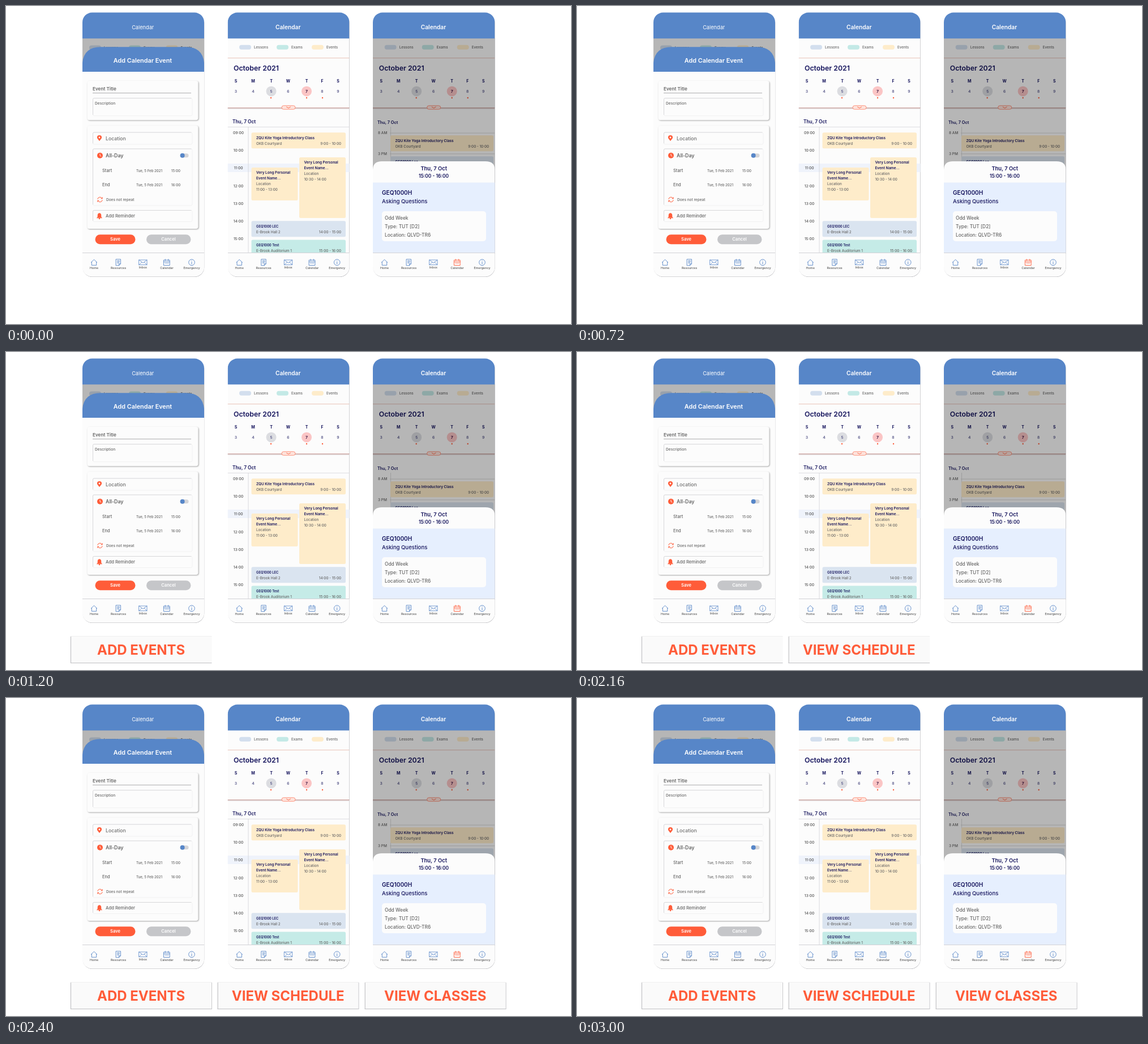
Recreate the animation shown at these times as an HTML page. Size 998 by 561 pixels, loop 3400 ms.

```html
<!DOCTYPE html>
<html lang="en">
<head>
<meta charset="utf-8">
<title>Calendar screens</title>
<style>
html, body { margin: 0; width: 100%; height: 100%; overflow: hidden; background: #fff; }
svg { display: block; width: 100%; height: 100%; }
text { font-family: Inter, "Open Sans", sans-serif; white-space: pre; }
.card { filter: drop-shadow(1.2px 1.2px .8px rgba(0, 0, 0, .34)); }
</style>
</head>
<body>
<svg id="stage" viewBox="0 0 998 561"></svg>
<script>
const BLUE = '#5786c8', NAVY = '#14135c', ORANGE = '#ff5c39', GRAY = '#666', PAPER = '#fcfcfc';
const SAND = '#feecca', MINT = '#c5ebe7', SKY = '#dae4f0';

const text = (x, y, s, size, fill = GRAY, weight = 500, anchor = 'start') =>
  `<text x="${x}" y="${y}" font-size="${size}" fill="${fill}" font-weight="${weight}" text-anchor="${anchor}">${s}</text>`;
const mid = (x, y, s, size, fill, weight) => text(x, y, s, size, fill, weight, 'middle');
const end = (x, y, s, size, fill, weight) => text(x, y, s, size, fill, weight, 'end');
const rect = (x, y, w, h, fill, r = 0, more = '') =>
  `<rect x="${x}" y="${y}" width="${w}" height="${h}" rx="${r}" fill="${fill}" ${more}/>`;
const dot = (x, y, r, fill, more = '') => `<circle cx="${x}" cy="${y}" r="${r}" fill="${fill}" ${more}/>`;
const path = (d, stroke, width = 1, fill = 'none') =>
  `<path d="${d}" stroke="${stroke}" stroke-width="${width}" fill="${fill}" stroke-linejoin="round" stroke-linecap="round"/>`;
const shift = (x, y, body) => `<g transform="translate(${x} ${y})">${body}</g>`;
const shade = (x, h) => rect(x, 57, 218, h, '#000', 0, 'opacity=".28"');

const icons = {
  Home: c => path('M-5.2 0L0-5L5.2 0M-4.2-.8V5H4.2V-.8', c, .9),
  Resources: c => path('M-4-5.5H4V2.5L1 5.5H-4ZM4 2.5H1V5.5M-2-3H2M-2-1H2M-2 1H1', c, .9),
  Inbox: c => path('M-7-4.3H7V4.3H-7ZM-7-4.3L0 1L7-4.3M-7 4.3L-2-.5M7 4.3L2-.5', c, .8),
  Calendar: c => path('M-5.2-4H5.2V5.2H-5.2ZM-5.2-1H5.2M-2.7-5.6V-3M2.7-5.6V-3M-3 1.4H-2M-.5 1.4H.5M2 1.4H3', c, .9),
  Emergency: c => dot(0, 0, 5.3, 'none', `stroke="${c}" stroke-width=".9"`) + path('M0-.5V2.7M0-2.7V-2.5', c, 1),
};

function nav(x, active) {
  const spots = [20.5, 63.5, 107, 149, 193];
  return rect(x, 435, 216, 43, PAPER) + rect(x, 435, 216, .8, '#c9c9cd') +
    Object.keys(icons).map((name, i) =>
      shift(x + spots[i], 452.3, icons[name](name === active ? ORANGE : BLUE)) +
      mid(x + spots[i], name === 'Inbox' ? 463.3 : 464.4, name, 5.4, '#555', 500)).join('');
}

function phone(id, x, w, body, active) {
  return `<clipPath id="${id}">${rect(x, 11.6, w, 465.7, '#000', 17)}</clipPath>` +
    rect(x + .3, 13, w, 465, '#b4b4b8', 17) +
    `<g clip-path="url(#${id})">${rect(x, 11, w, 467, PAPER)}${body}${nav(x, active)}</g>`;
}

const header = (x, w, size, weight) =>
  rect(x, 11, w, 46.3, BLUE) + mid(x + w / 2 - .8, 41, 'Calendar', size, '#fff', weight);

const legend = (x, gaps) => ['Lessons', 'Exams', 'Events'].map((s, i) =>
  rect(x + gaps[i], 68.7, 21, 8, ['#d3dfee', '#c3e9e6', SAND][i], 4) +
  text(x + gaps[i] + 26, 75, s, 6.3)).join('');

function week() {
  const xs = [406, 436.5, 468.5, 498.5, 531, 558.5, 586.5];
  return legend(412, [0, 66, 128]) + rect(391, 91.3, 217, 1, '#e8c0b6') +
    text(402, 114.4, 'October 2021', 12.3, NAVY, 600) +
    dot(468.5, 150.4, 9, '#dcdde1') + dot(531, 150.4, 9, '#fbc5c5') +
    xs.map((x, i) => mid(x, 135, 'SMTWTFS'[i], 7, NAVY, 700) +
      mid(x, 153.4, i + 3, 6.8, i === 4 ? '#3b1540' : '#45457c', i === 4 ? 700 : 500)).join('') +
    [468, 531, 559].map(x => dot(x, 162, 1.2, ORANGE)).join('') +
    rect(391, 180.4, 217, 1.4, '#e3dfe1') + rect(391, 179.2, 217, 1.3, '#c99d98') +
    rect(487, 175.7, 24, 6.6, '#fde3dc', 3.3, `stroke="${ORANGE}" stroke-width=".6"`) +
    path('M495.5 178L499 180.2L502.5 178', ORANGE, .9);
}

// One schedule block; the lines run downwards, the first `bold` of them in strong type.
function block(x, y, w, h, fill, lines, bold = 1, time = '', size = 6.4) {
  return rect(x, y, w, h, fill, 2.5) +
    lines.map((s, i) => text(x + 8.5, y + 11.2 + i * 9.8 + (i === 1 && bold === 1 ? .7 : 0), s,
      i < bold ? size : 6.25, i < bold ? NAVY : GRAY, i < bold ? 600 : 500)).join('') +
    (time && end(x + w - 8, y + 21.7, time, 6.25));
}

const lesson = ['ZQU Kite Yoga Introductory Class', 'OKB Courtyard'];
const longName = ['Very Long Personal', 'Event Name...', 'Location'];

function schedule() {
  const hours = Array.from({ length: 7 }, (_, i) =>
    mid(410.5, 226.2 + i * 31.1, String(i + 9).padStart(2, '0') + ':00', 6.6, '#555', 500)).join('');
  return header(391.5, 215, 10.2, 600) + week() +
    text(400, 207.2, 'Thu, 7 Oct', 8.3, NAVY, 600) +
    rect(391, 213, 217, .8, '#d8d8dc') + rect(391, 278, 217, 15, '#eff3fb') +
    rect(427.6, 213, .8, 222, '#d2d2d6') + hours +
    block(433.5, 223.3, 166.5, 28, SAND, lesson, 1, '9:00 - 10:00') +
    block(433.5, 285, 82, 58, SAND, [...longName, '11:00 - 13:00'], 2) +
    block(518, 267, 82, 107, SAND, [...longName, '10:30 - 14:00'], 2) +
    block(433.5, 379.3, 166.5, 28, SKY, ['GEQ1000 LEC', 'E-Brook Hall 2'], 1, '14:00 - 15:00', 5.9) +
    block(433.5, 412.6, 166.5, 28, MINT, ['GEQ1000 Test', 'E-Brook Auditorium 1'], 1, '15:00 - 16:00', 5.9);
}

function details() {
  return shift(256.7, 0, week()) +
    text(656, 207.8, 'Thu, 7 Oct', 7.3, NAVY, 600) +
    text(657, 226.4, '8 AM', 6.5) + text(657, 263.2, '3 PM', 6.5) +
    rect(678, 223.7, 186, .8, '#ccc') + rect(678, 260.5, 186, .8, '#ccc') + rect(679, 213, .7, 70, '#ccc') +
    block(679, 228.3, 182, 28, SAND, lesson, 1, '9:00 - 10:00') +
    block(679, 265.3, 182, 28, SKY, ['GEQ1000 Lec'], 1, '', 6.2) +
    shade(647, 380) + header(648, 215.5, 10.2, 600) +
    path('M648 436V289Q648 274 664 274H847Q863.5 274 863.5 289V436Z', 'none', 0, PAPER) +
    rect(648, 311.5, 216, 124, '#e6effe') +
    mid(755.7, 290.4, 'Thu, 7 Oct', 9.4, NAVY, 600) +
    mid(755.5, 303.2, '15:00 - 16:00', 8.4, NAVY, 600) +
    text(664, 333.3, 'GEQ1000H', 10.1, NAVY, 600) +
    text(664, 348.2, 'Asking Questions', 9.6, NAVY, 500) +
    rect(664, 362, 184, 53, PAPER, 5) +
    ['Odd Week', 'Type: TUT [D2]', 'Location: QLVD-TR6'].map((s, i) =>
      text(669, 376.6 + i * 15.2, s, 8.4)).join('');
}

const field = (y, h) => rect(153.5, y, 175.5, h, PAPER, 2.5, 'stroke="#ececee" stroke-width=".7"') +
  path(`M153.5 ${y + h - 2}V${y + 2}Q153.5 ${y} 155.5 ${y}H327`, '#d2d2d5', .8);
const panel = (y, h) => rect(143.5, y, 196, h, PAPER, 4, 'class="card"');

function form() {
  const dates = [['Start', '15:00'], ['End', '16:00']].map(([s, t], i) => {
    const y = 293 + i * 25;
    return text(170, y, s, 7.5) + text(230, y - .3, 'Tue, 5 Feb 2021', 6.15) + text(292, y - .3, t, 6.15);
  }).join('');
  return shift(0, .8, legend(147, [0, 70, 135.5])) + shade(134, 60) +
    header(135, 215, 9.2, 400) +
    path('M135 116V100Q138 72.2 167 72.2H318Q347 72.2 350 100V116Z', 'none', 0, BLUE) +
    rect(134, 116, 218, 320, PAPER) +
    mid(241.5, 100.1, 'Add Calendar Event', 10.8, '#fff', 600) +
    panel(132, 69.3) + text(153, 149, 'Event Title', 8.2, GRAY, 600) +
    rect(153, 153, 174, .9, '#a5a5a8') + field(162.7, 31) + text(157, 174.4, 'Description', 6.6) +
    panel(211, 182) + field(223, 21) + field(252, 100) + field(360.5, 20) +
    path('M165 238.3C163 235.5 160.9 233.7 160.9 231.8A4.1 3.9 0 0 1 169.1 231.8C169.1 233.7 167 235.5 165 238.3Z', 'none', 0, ORANGE) +
    dot(165, 232, 1.4, '#fff') + text(176, 236.8, 'Location', 8.7, '#707070') +
    dot(166, 263.7, 5, ORANGE) + path('M166 261V264L168 265', '#fff', .9) +
    text(176, 266.9, 'All-Day', 8.8, GRAY, 600) +
    rect(308, 260.3, 14.5, 7, '#d5d5d8', 3.5) + dot(311.6, 263.7, 4, BLUE) + dates +
    path('M161.8 340.5A4.3 4.3 0 0 1 169.8 339.5M170.2 342.5A4.3 4.3 0 0 1 162.2 343.5M168 339.8H170.2V337.6M164 343.2H161.8V345.4', ORANGE, 1) +
    text(177, 343.7, 'Does not repeat', 6.5) +
    path('M160.6 373.8L162 371.6V369Q162 365.8 165 365.5Q168 365.8 168 369V371.6L169.4 373.8Z', ORANGE, .5, ORANGE) +
    dot(165, 375, 1.2, ORANGE) + text(176, 373.3, 'Add Reminder', 7.7) +
    rect(157.5, 403.3, 71, 17, ORANGE, 8.5) + mid(193, 414.4, 'Save', 7.5, '#fff', 600) +
    rect(248, 403.3, 78.5, 17, '#c5c6c9', 8.5) + mid(287, 414.4, 'Cancel', 7.6, '#fff', 600);
}

const captions = [
  { at: 1200, x: 114, s: 'ADD EVENTS' },
  { at: 1800, x: 373.6, s: 'VIEW SCHEDULE' },
  { at: 2400, x: 633.7, s: 'VIEW CLASSES' },
];

const caption = ({ x, s }) => `<g class="caption" visibility="hidden">${
  rect(x, 501.5, 249.5, 47, '#fafafa') + rect(x, 501.3, 249.5, .6, '#e8e8e8') +
  rect(x, 502, 1, 47, '#b9b9bc') + rect(x, 548.2, 249.5, .9, '#b9b9bc') +
  `<g class="edge">${rect(x + 249, 502, .9, 47, '#c4c4c7')}</g>` +
  mid(x + 124.6, 534.2, s, 24, ORANGE, 700)}</g>`;

const stage = document.getElementById('stage');
stage.innerHTML = phone('add', 135, 215, form()) + phone('plan', 391.7, 214.8, schedule()) +
  phone('info', 648, 215.4, details(), 'Calendar') + captions.map(caption).join('');

const cards = stage.querySelectorAll('.caption');
const edges = stage.querySelectorAll('.edge');

function draw(now) {
  const t = now % 3400;
  captions.forEach(({ at }, i) => {
    cards[i].setAttribute('visibility', t >= at ? 'visible' : 'hidden');
    edges[i].setAttribute('opacity', t >= 2400 ? 1 : 0);
  });
}

const start = performance.now();
function tick() {
  draw(performance.now() - start);
  requestAnimationFrame(tick);
}
tick();
</script>
</body>
</html>
```
